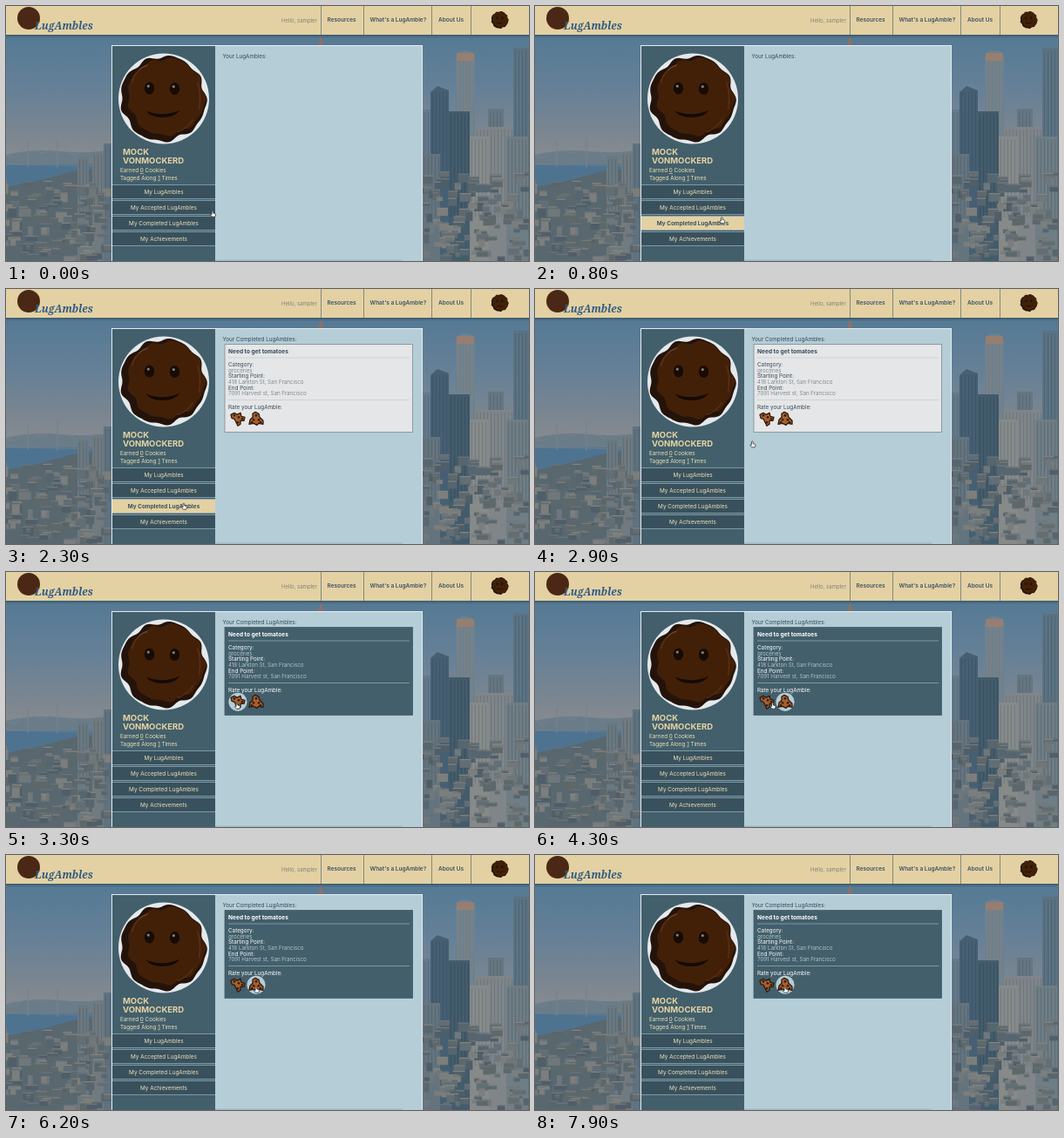
An HTML page for the animation above (8000 ms loop, 600 by 293 pixels).

```html
<!DOCTYPE html>
<html lang="en">
<head>
<meta charset="utf-8">
<title>LugAmbles</title>
<style>
  html, body { margin: 0; width: 100%; height: 100%; overflow: hidden; background: #64798a; }
  svg { display: block; width: 600px; height: 293px; }
  text { font: 6.3px Inter, "Open Sans", sans-serif; fill: #34495a; }
  .nav text { font-size: 6.5px; font-weight: 600; fill: #3d5064; }
  .nav .thin { font-size: 6.15px; font-weight: 300; fill: #66706f; }
  .nav .logo { font: italic bold 11.8px "Noto Serif", serif; fill: #315a83; }
  .side text { fill: #efe0b6; }
  .side .name { font-size: 9.5px; font-weight: 700; fill: #e6d3a3; }
  .row rect { fill: #38515d; }
  .row path { stroke: #8fa9b6; stroke-width: .8; }
  .row text { font-size: 6.4px; text-anchor: middle; }
  .row.on rect { fill: #e3d1a3; }
  .row.on text { fill: #38515d; font-weight: 700; }
  .card > rect { fill: #e5e6e7; stroke: #7d8a91; stroke-width: .8; }
  .card > path { stroke: #c5c9cb; stroke-width: .7; }
  .card .head { font-size: 6.6px; font-weight: 700; }
  .card .thin { font-weight: 300; fill: #64727c; }
  .card.on > rect { fill: #425f6b; stroke: #425f6b; }
  .card.on > path { stroke: #9db0b9; }
  .card.on text { fill: #fff; }
  .card.on .thin { fill: #d3dde2; }
  .halo { fill: #b5cdd7; visibility: hidden; }
  .on > .halo { visibility: visible; }
</style>
</head>
<body>
<svg id="stage" viewBox="0 0 600 293"></svg>
<script>
let seed = 11;
const rand = (a, b) => (seed = seed * 16807 % 2147483647, a + (b - a) * seed / 2147483647);
const pick = list => list[Math.floor(rand(0, list.length))];
const many = (n, f) => Array.from({ length: n }, (_, i) => f(i)).join('');
const rect = (x, y, w, h, fill) => `<rect x="${x}" y="${y}" width="${w}" height="${h}" fill="${fill}"/>`;
const text = (x, y, s, cls = '') => `<text x="${x}" y="${y}" class="${cls}">${s}</text>`;
const line = (d, color, w = 1) => `<path d="${d}" fill="none" stroke="${color}" stroke-width="${w}"/>`;

// Closed outline whose radius is a function of the angle
const blob = (radius, n = 120) => 'M' + Array.from({ length: n }, (_, i) => {
  const a = i / n * 2 * Math.PI, r = radius(a);
  return (r * Math.cos(a)).toFixed(1) + ' ' + (r * Math.sin(a)).toFixed(1);
}).join('L') + 'Z';

const tower = (x, y, w, fill, stripe) =>
  rect(x, y, w, 293 - y, fill) + many(Math.floor(w / 4), i => rect(x + 2 + i * 4, y + 3, 1, 240 - y, stripe));

const house = (x, y) => {
  const w = rand(5, 15), h = rand(4, 12);
  return rect(x, y, w, h, pick(['#6f777b', '#626d74', '#57656e', '#7b7e7c', '#4f5e68', '#5e686a'])) +
    rect(x, y, w, 1.2, pick(['#84847f', '#69747a', '#747a7c']));
};
const houses = (n, x0, x1, y0, y1) => many(n, i => house(rand(x0, x1), y0 + (y1 - y0) * i / n));

const city = () => `<rect width="600" height="293" fill="url(#sky)"/>
  <path d="M0 171Q30 164 62 167T122 165V190H0Z" fill="#6b7c89"/>` +
  rect(0, 182, 122, 40, '#4e7390') +
  line('M0 170Q12 183 25 155Q42 184 59 152Q82 186 122 179M0 182L122 184', '#7b8891', .6) +
  line('M25 155V185M59 151V186', '#76838c', 1.2) +
  '<path d="M0 208L40 200L80 189L122 186V293H0Z" fill="#59686f"/>' +
  tower(82, 173, 13, '#6a7880', '#5b6b75') + tower(99, 168, 15, '#707a7f', '#5e6c75') +
  tower(112, 158, 12, '#5f7280', '#526672') +
  houses(110, -8, 116, 200, 288) +
  tower(478, 119, 9, '#64798a', '#566d7d') + tower(582, 48, 18, '#5b7282', '#4d6576') +
  tower(553, 118, 18, '#667681', '#586a77') + tower(538, 139, 44, '#7f8588', '#6c777f') +
  '<path d="M516 150V60Q517 51 526.5 51Q537 51 538 60V293H516Z" fill="#6b8292"/>' +
  many(5, i => rect(518 + i * 4, 62, 1.2, 90, '#877f79')) + rect(517, 54, 20, 9, '#967f70') +
  '<path d="M487 99L495 92L508 97V293H487Z" fill="#465f72"/>' +
  many(5, i => rect(489 + i * 4, 99, 1, 90, '#3c5568')) +
  tower(508, 121, 24, '#435c6c', '#384f5f') + tower(532, 150, 22, '#868a89', '#727b80') +
  tower(478, 170, 20, '#64747e', '#566873') + tower(574, 150, 25, '#6f7d84', '#5c6c77') +
  houses(110, 472, 594, 190, 288) +
  '<path d="M361 34L364.5 45H358Z" fill="#8a716a"/>';

const bumps = a => 1.3 * Math.sin(9 * a + .6) + Math.sin(13 * a + 2) + .8 * Math.sin(4 * a);
const cookie = `<path d="${blob(a => 48.6 + bumps(a))}" fill="#24130a"/>
  <path transform="translate(3.3 -2.2)" d="${blob(a => 43.8 + bumps(a))}" fill="#422008"/>` +
  line('M-36 -18Q-33 -33 -18 -38M39 -19Q44 -5 41 12M16 38Q28 34 34 24', '#5a3018', 1.4) +
  line('M-28 -33Q-24 -37 -18 -39', '#80583d', .8) +
  many(2, i => `<g transform="translate(${i ? 13 : -16} ${-12 + i * .5})"><ellipse rx="5.7" ry="7" fill="#170b05"/>
    <circle cx="-1.2" cy="-2.4" r="1.6" fill="#8d7b70"/></g>`) +
  '<path d="M-20 14Q0 22 19 13Q14 21 0 21.5Q-14 22 -20 14Z" fill="#150a04"/>';

const rating = (x, y, shape, chips) => `<g class="rate" transform="translate(${x} ${y})">
  <circle class="halo" r="10.6"/><path d="${shape}" fill="#a5602f" stroke="#30190d" stroke-width="1.3" stroke-linejoin="round"/>` +
  chips.map(([cx, cy]) => `<circle cx="${cx}" cy="${cy}" r="1.35" fill="#351a0d"/>`).join('') + '</g>';

const rows = ['My LugAmbles', 'My Accepted LugAmbles', 'My Completed LugAmbles', 'My Achievements'];
const row = (label, i) => `<g class="row" transform="translate(122 ${205.5 + 18 * i})">
  <rect width="118" height="16"/><path d="M0 0H118M0 16H118"/>${text(59, 10.4, label)}</g>`;

const stage = document.getElementById('stage');
stage.innerHTML = `<defs>
  <linearGradient id="sky" x2="0" y2="1"><stop offset=".1" stop-color="#547994"/><stop offset=".32" stop-color="#658097"/>
    <stop offset=".5" stop-color="#7b8690"/><stop offset=".58" stop-color="#858a90"/><stop offset="1" stop-color="#5f6e76"/></linearGradient>
  <linearGradient id="shade" x2="0" y2="1"><stop stop-color="#24404f" stop-opacity=".55"/><stop offset="1" stop-color="#24404f" stop-opacity="0"/></linearGradient>
  </defs>${city()}
  <g class="nav">${rect(0, 33, 600, 4, 'url(#shade)')}${rect(0, 0, 600, 33, '#e3d1a3')}
    ${line('M361.5 0V33M410.5 0V33M488.5 0V33M533.5 0V33', '#7b8078', .9)}
    <circle cx="26" cy="14" r="13" fill="#4a2815"/>
    ${text(33, 26.5, 'LugAmbles', 'logo')}${text(316, 18.5, 'Hello, sampler', 'thin')}
    ${text(368.5, 18, 'Resources')}${text(417.5, 18, "What's a LugAmble?")}${text(496, 18, 'About Us')}
    <g transform="translate(566.5 16) scale(.2)">${cookie}</g></g>
  ${rect(121, 45, 357, 250, '#e6edf0')}${rect(240, 46, 237, 247, '#b5cdd7')}
  ${rect(240, 291.5, 215, 1.5, '#a3bac5')}
  <g class="side">${rect(122, 46, 118, 247, '#425f6b')}
    <circle cx="181" cy="106.5" r="52" fill="#e4e9ec"/>
    <g transform="translate(180.5 106.5)">${cookie}</g>
    ${text(134, 171.3, 'MOCK', 'name')}${text(134, 181, 'VONMOCKERD', 'name')}
    ${text(131, 191, 'Earned <tspan text-decoration="underline">0</tspan> Cookies')}
    ${text(131, 199.5, 'Tagged Along <tspan text-decoration="underline">1</tspan> Times')}
    ${rows.map(row).join('')}</g>
  <text id="title" x="248.5" y="60.3"></text>
  <g class="card"><rect x="251" y="63.5" width="215.5" height="101"/><path d="M255 79H463M255 127.5H463"/>
    ${text(255, 74, 'Need to get tomatoes', 'head')}
    ${text(255, 89.2, 'Category:')}${text(255, 95.7, 'groceries', 'thin')}
    ${text(255, 102.3, 'Starting Point:')}${text(255, 109, '418 Larkton St, San Francisco', 'thin')}
    ${text(255, 115.8, 'End Point:')}${text(255, 122.4, '7091 Harvest st, San Francisco', 'thin')}
    ${text(255, 138, 'Rate your LugAmble:')}
    ${rating(266, 149.3, 'M-8 -5L-4 -7L-1 -5L3 -7L4 -3L8 -2L7 2L3 2L3 6L0 8L-2 4L-4 0L-7 -1Z', [[-4, -4], [1, -2], [5, 0], [0, 4]])}
    ${rating(287, 149.3, 'M-1 -8L3 -6L4 -2L8 2L8 6L3 5L1 7L-3 5L-8 6L-7 1L-4 -2L-4 -6Z', [[0, -4], [-3, 1], [3, 1], [-5, 4], [5, 4]])}</g>
  <path id="hand" d="M-.9 .8Q0 -.3 .8 .8V3L2.8 3.5Q3.8 3.8 3.5 5.3L2.8 7.2H-.6L-2.6 4.8Q-2.3 3.8 -.9 4.6Z" fill="#fff" stroke="#17191b" stroke-width=".7" stroke-linejoin="round"/>`;

const find = s => stage.querySelector(s);
const rowEls = stage.querySelectorAll('.row'), rateEls = stage.querySelectorAll('.rate');
const card = find('.card'), title = find('#title'), hand = find('#hand');

// Pointer stops: time, x, y
const stops = [[0, 237, 235], [300, 237, 235], [1100, 204, 246], [2500, 204, 246], [3100, 265, 150],
  [3900, 265, 150], [4250, 272.5, 150], [4400, 272.5, 150], [4800, 287, 151], [8000, 287, 151]];

function pointer(t) {
  const i = stops.findIndex(s => s[0] > t), [t0, x0, y0] = stops[i - 1], [t1, x1, y1] = stops[i];
  const u = (t - t0) / (t1 - t0), e = u * u * (3 - 2 * u);
  return [x0 + (x1 - x0) * e, y0 + (y1 - y0) * e];
}

function draw() {
  const t = performance.now() % 8000, [x, y] = pointer(t);
  rowEls.forEach((el, i) => {
    const top = 205.5 + 18 * i;
    el.classList.toggle('on', x < 235 && y >= top && y <= top + 16);
  });
  title.textContent = t < 1600 ? 'Your LugAmbles:' : 'Your Completed LugAmbles:';
  card.style.display = t < 2000 ? 'none' : '';
  const over = x > 251 && y < 165;
  card.classList.toggle('on', over);
  const rated = over && y > 139 ? (x < 271 ? 0 : 1) : -1;
  rateEls.forEach((el, i) => el.classList.toggle('on', i === rated));
  hand.setAttribute('transform', `translate(${x} ${y})`);
  requestAnimationFrame(draw);
}
draw();
</script>
</body>
</html>
```
